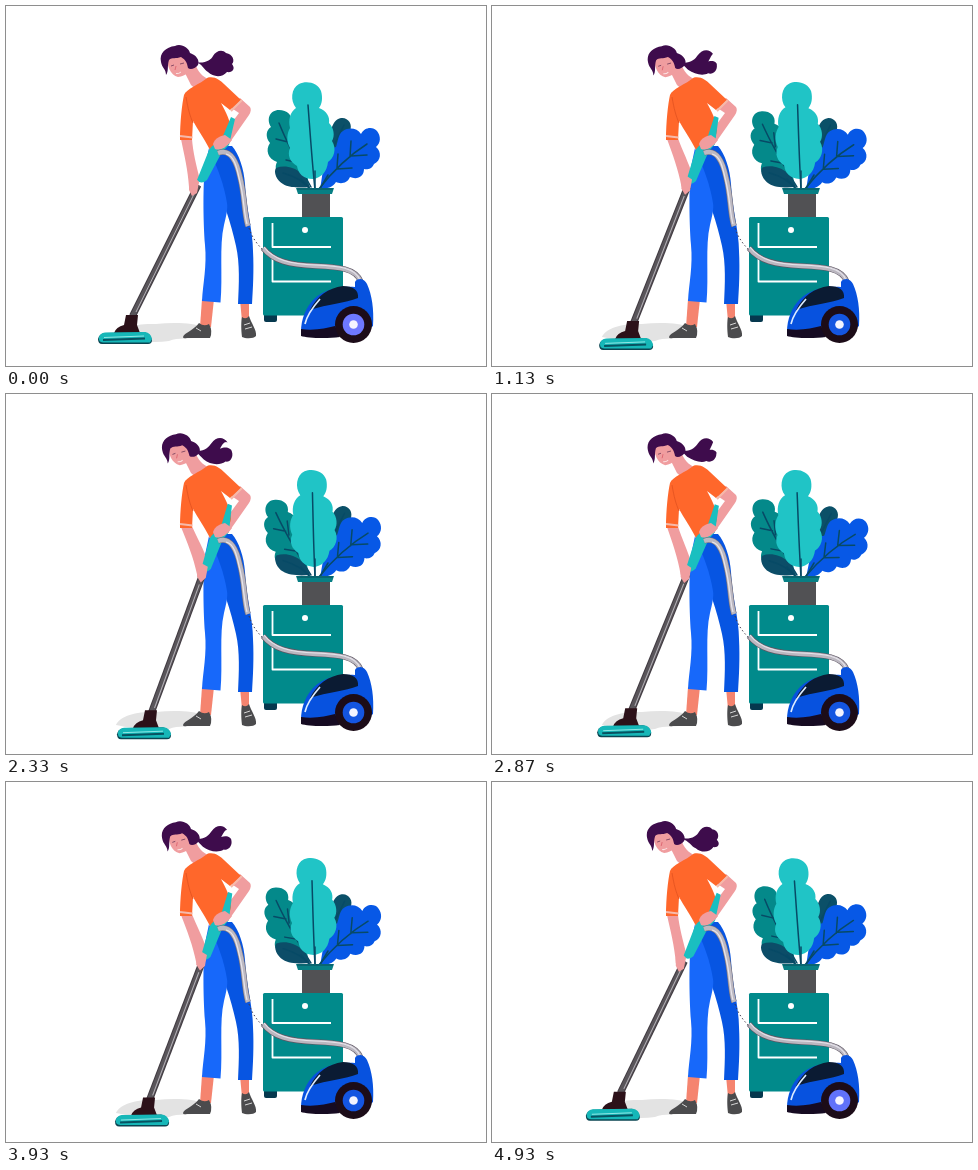
Animation, 480 px wide and 360 px high, one loop 4990 ms. Source, as an HTML page:

```html
<!DOCTYPE html>
<html lang="en">
<head>
<meta charset="utf-8">
<title>Vacuuming</title>
<style>
html, body { margin: 0; width: 100%; height: 100%; overflow: hidden; background: #fff; }
svg { display: block; width: 100vw; height: 100vh; }
.line { fill: none; stroke-linejoin: round; }
.vein { fill: none; stroke: #074a66; stroke-linecap: round; }
.skin { fill: #f09d9f; }
.ankle { fill: #f5846f; }
.hair { fill: #3e0c4c; }
.shoe { fill: #4b4b4d; }
</style>
</head>
<body>
<svg viewBox="0 0 480 360">
  <path fill="#e3e3e3" d="M110 331C113 323 128 317 150 318C168 316 190 317 195 321L196 330C184 334 172 331 163 335C145 338 124 334 110 331Z"/>

  <g id="plant" stroke-width="1.500">
    <g id="navyRight">
      <path fill="#0b5068" d="M322 142C324 128 325 114 335 112C342 111 347 118 344 125C342 133 334 140 328 150Z"/>
      <path class="vein" d="M338 119L318 160"/>
    </g>
    <g id="darkLeaf">
      <path fill="#04898a" d="M303 182C300 177 292 174 283 172C273 171 267 164 271 156C262 153 259 144 264 137C259 131 260 124 265 121C260 113 264 104 273 104C281 104 287 109 285 117C293 120 296 129 298 140Z"/>
      <path class="vein" d="M273 117C281 137 292 158 305 181M285 140L284 126M282 136L270 133M294 157L280 154"/>
    </g>
    <g id="navyLeft">
      <path fill="#0c4d68" d="M304 181C295 182 283 182 277 178C271 175 267 166 270 162C278 159 288 161 295 167C300 172 302 176 304 181Z"/>
      <path class="vein" d="M277 167C288 170 298 175 305 184"/>
    </g>
    <g id="blueLeaf">
      <path fill="#0758e6" d="M314 183C316 174 316 163 320 157C318 149 322 142 330 141C332 136 332 128 337 125C343 121 351 122 355 128C358 121 367 120 371 125C375 130 375 137 370 141C376 146 375 155 368 158C366 163 361 164 358 163C358 171 351 174 344 171C341 178 334 178 330 176C327 181 321 183 314 183Z"/>
      <path class="vein" d="M312 184C326 166 342 150 361 138M331 162L332 148M344 151L345 135M331 163L346 162M345 150L361 149"/>
    </g>
    <g id="topLeaf">
      <path fill="#20c4c6" d="M307 173C297 173 292 167 291 160C284 156 281 149 284 142C280 135 281 127 284 122C282 114 284 106 290 102C284 95 285 82 293 78C301 74 312 77 315 85C317 92 316 98 313 102C321 105 324 111 323 117C328 122 329 130 326 135C331 143 328 152 322 156C321 166 315 172 307 173Z"/>
      <path class="vein" d="M302 99C304 125 306 155 309 184"/>
    </g>
    <path class="vein" d="M295 173L307 186M322 169L312 186M309 165V186"/>
  </g>
  <path fill="#515154" d="M296 187H324V211H296Z"/>
  <path fill="#087f84" d="M290 182H328L326 188H292Z"/>
  <path class="line" stroke="#0a4d5c" d="M291 183H327"/>

  <path fill="#06384e" d="M258 307H271V314Q271 316 269 316H260Q258 316 258 314Z"/>
  <rect x="257" y="211" width="80" height="98.500" rx="1.500" fill="#018a8b"/>
  <path class="line" stroke="#fff" stroke-width="1.800" d="M266.500 217V241H325M266.500 252V275.500H325"/>
  <circle cx="299" cy="224" r="3" fill="#fff"/>

  <g class="line">
    <path stroke="#5d5562" stroke-width="5.600" d="M257 242C267 255 283 259 310 260C332 261 350 262 355 276"/>
    <path stroke="#bbb7c0" stroke-width="4.400" d="M257 242C267 255 283 259 310 260C332 261 350 262 355 276"/>
    <path stroke="#e6e3ea" stroke-width="1.200" d="M258 241C268 254 284 258 310 259C331 260 349 261 354 274"/>
  </g>

  <path fill="#0752df" d="M295 326C295 313 300 301 308 293C318 284 332 280 349 281L349 276Q350 273 355 273Q359 274 361 278C366 289 368 303 367 320L361 325L326 330Z"/>
  <path fill="#0b1b33" d="M304 304C311 290 322 282 337 280C347 280 353 284 352 292C339 297 322 298 304 304Z"/>
  <path class="line" stroke="#dcecff" stroke-width="1.700" d="M299 318C301 309 306 302 314 293"/>
  <path fill="#160b22" d="M295 323C309 325 320 322 329 320L334 331C320 333 301 332 295 330Z"/>
  <circle cx="347.500" cy="318.500" r="18.500" fill="#1c0c18"/>
  <circle id="wheel" cx="347.500" cy="318.500" r="10.800"/>
  <circle cx="347.500" cy="318.500" r="4.300" fill="#f4f4ff"/>

  <path class="ankle" d="M196 293H208L205 321H194Z"/>
  <path class="ankle" d="M234 294H243L243 315H236Z"/>
  <path class="shoe" d="M177 331C178 327 188 324 193 317Q198 321 203 318Q207 325 204 332H181Q177 333 177 331Z"/>
  <path class="shoe" d="M236 331C235 324 235 315 236 311Q240 314 243 310C245 317 251 324 250 330Q247 333 239 332Z"/>
  <path class="line" stroke="#d5d5d5" d="M190 322L195 325M238 319L244 317M239 323L246 321"/>

  <path fill="#0755e2" d="M204 140H226C233 148 238 163 239 178C240 202 247 225 247 245C248 265 247 282 246 298H232C233 278 234 258 230 240C225 217 217 193 205 165Z"/>
  <path fill="#1768fa" d="M203 142L207 152C212 164 218 178 221 197C222 203 220 211 218 219C213 240 217 270 214.500 296.500L196 295C197 277 201 260 199 239C197 213 197 177 199 161Z"/>

  <path class="skin" d="M178 65L190 60C193 68 199 72 206 75L196 89L185 79Z"/>
  <path class="skin" d="M224 101L234 92L244 101Q246 104 243 109L222 139C216 144 208 142 207 139L216 130L233 107Z"/>
  <path id="leftArm" class="skin"/>
  <path fill="#ff672b" d="M178 89C180 83 194 78 202 71.500C209 70 214 74 218 78L235 94L224 104L215 97C220 106 225 116 225 125C224 133 217 137 213 145L204 144C198 132 192 124 187 115L186 134H174C174 116 176 98 178 89Z"/>
  <path class="line" stroke="#e85622" d="M180 91C182 103 184 110 187 117"/>
  <path class="line" stroke="#f6b9aa" stroke-width="2" d="M174 130L186.500 131.500M225 105L236 94"/>

  <g id="wand">
    <path class="line" stroke="#403a41" stroke-width="7" d="M192 179L126.500 310"/>
    <path class="line" stroke="#59555a" stroke-width="5" d="M192 179L126.500 310"/>
    <path class="line" stroke="#b5b2b8" d="M188 188L130 306"/>
    <path fill="#1abfc0" d="M225 111L229 113L223 139L216 146L201 174Q195 179 191 174L203 144Q206 138 214 137Z"/>
  </g>
  <path class="skin" d="M207 138C209 132 214 130 219 129L226 134C220 142 214 145 209 143Z"/>
  <path id="leftHand" class="skin"/>

  <g class="line">
    <path stroke="#77717c" stroke-width="5.600" d="M212 147C225 142 231 157 234 171C239 190 238 208 242 220"/>
    <path stroke="#bcb8c1" stroke-width="4.400" d="M212 147C225 142 231 157 234 171C239 190 238 208 242 220"/>
    <path stroke="#e9e6ec" stroke-width="1.200" d="M220 148C229 150 231 163 234 176C238 192 238 208 241 218"/>
    <path stroke="#40394a" stroke-dasharray="1.500 2.500" d="M243 222C246 231 250 237 257 244"/>
  </g>

  <g id="foot">
    <path fill="#2c1119" d="M120 309H132L131 319L134 327H108Q110 321 118 319Z"/>
    <path fill="#0a4552" d="M92 333Q93 328 99 327L138 326Q145 328 146 334Q146 338 142 338H96Q92 338 92 333Z"/>
    <path fill="#16b7b8" d="M93 331Q94 327 99 326.500L139 326Q145 327 146 333L144 336.500L97 336.500Q92 336 93 331Z"/>
    <path class="line" stroke="#075261" stroke-width="2" d="M97 334L139 332.500"/>
    <path class="line" stroke="#8ee8e6" d="M98 331.500L138 330"/>
  </g>

  <path id="ponytail" class="hair"/>
  <g id="head">
    <path class="skin" d="M161 50C161 60 164 69 172 71C180 70 186 65 187 56L181 46Z"/>
    <path class="hair" d="M155 56C153 47 160 41 169 40C175 37 183 42 184 47C190 49 194 54 192 59C189 63 184 64 182 62C181 57 180 54 175 51C170 53 166 51 163 54C161 60 163 65 160 69C160 63 156 62 155 56Z"/>
    <path class="line" stroke="#7d4560" stroke-width=".9" d="M165 60L168 59M174 58L178 57"/>
    <path class="line" stroke="#dc6570" stroke-width=".9" d="M170 60L169 64"/>
    <path class="line" stroke="#fbe3e3" d="M170 67.500Q173 68 175 66"/>
  </g>
</svg>
<script>
const LOOP = 4990, STEP = 1000 / 15;
const el = id => document.getElementById(id);

// Back-and-forth value 0..1..0 over the given number of steps.
const swing = (step, period) => 1 - Math.abs(1 - 2 * (step / period % 1));

// Blends two path strings of the same structure.
function blend(from, to, p) {
  const ends = to.match(/-?[\d.]+/g);
  let i = 0;
  return from.replace(/-?[\d.]+/g, n => (+n + (ends[i++] - n) * p).toFixed(2));
}

const morphs = {
  ponytail: [
    'M189 56C199 58 205 54 207 50C210 45 216 43 220 47C227 48 229 55 226 58C230 63 226 67 221 66C216 72 207 71 202 66C198 64 196 57 189 56Z',
    'M189 57C198 58 202 53 205 49C210 42 218 42 222 49C217 46 213 49 211 54C217 49 225 51 227 55C231 61 228 68 224 68C217 74 206 74 200 68C204 61 197 60 189 57Z'
  ],
  leftArm: [
    'M175 133L186 133C187 146 190 158 194 174L188 189L183 181C182 164 178 148 175 133Z',
    'M175 133L186 132C192 143 200 155 205 169L200 187L193 180C189 164 182 148 175 133Z'
  ],
  leftHand: [
    'M183 176L188 171L193 176L191 187L186 190L183 184Z',
    'M193 176L198 169L204 172L202 183L197 188L193 182Z'
  ]
};

const turn = (id, angle, x, y) =>
  el(id).setAttribute('transform', `rotate(${angle} ${x} ${y})`);

const GRIP = { x: 213, y: 140 }, JOINT = { x: 126, y: 310 };

function moveWand(p) {
  const angle = -7.8 * p, a = angle * Math.PI / 180;
  const dx = JOINT.x - GRIP.x, dy = JOINT.y - GRIP.y;
  const x = dx * Math.cos(a) - dy * Math.sin(a) - dx;
  const y = dx * Math.sin(a) + dy * Math.cos(a) - dy;
  turn('wand', angle, GRIP.x, GRIP.y);
  el('foot').setAttribute('transform', `translate(${x} ${y * 0.85})`);
}

function draw(ms) {
  const step = Math.floor((ms % LOOP + 4) / STEP);
  const push = swing(step, 25), sway = swing(step, 18.75);

  moveWand(push);
  for (const id in morphs) el(id).setAttribute('d', blend(...morphs[id], push));
  el('head').setAttribute('transform', `translate(${2 * push} 0) rotate(${-2 * push} 180 65)`);

  turn('topLeaf', 3.7 * push, 309, 185);
  turn('darkLeaf', -3.5 * push, 305, 183);
  turn('navyLeft', push, 305, 183);
  turn('blueLeaf', 4.8 * sway, 314, 184);
  turn('navyRight', 1.8 * sway, 312, 184);

  const tint = Math.max(0, 1 - push / 0.5);
  el('wheel').setAttribute('fill', `rgb(${20 + 90 * tint},${85 + 35 * tint},${225 + 30 * tint})`);
}

const start = performance.now();
function tick() {
  draw(performance.now() - start);
  requestAnimationFrame(tick);
}
tick();
</script>
</body>
</html>
```
